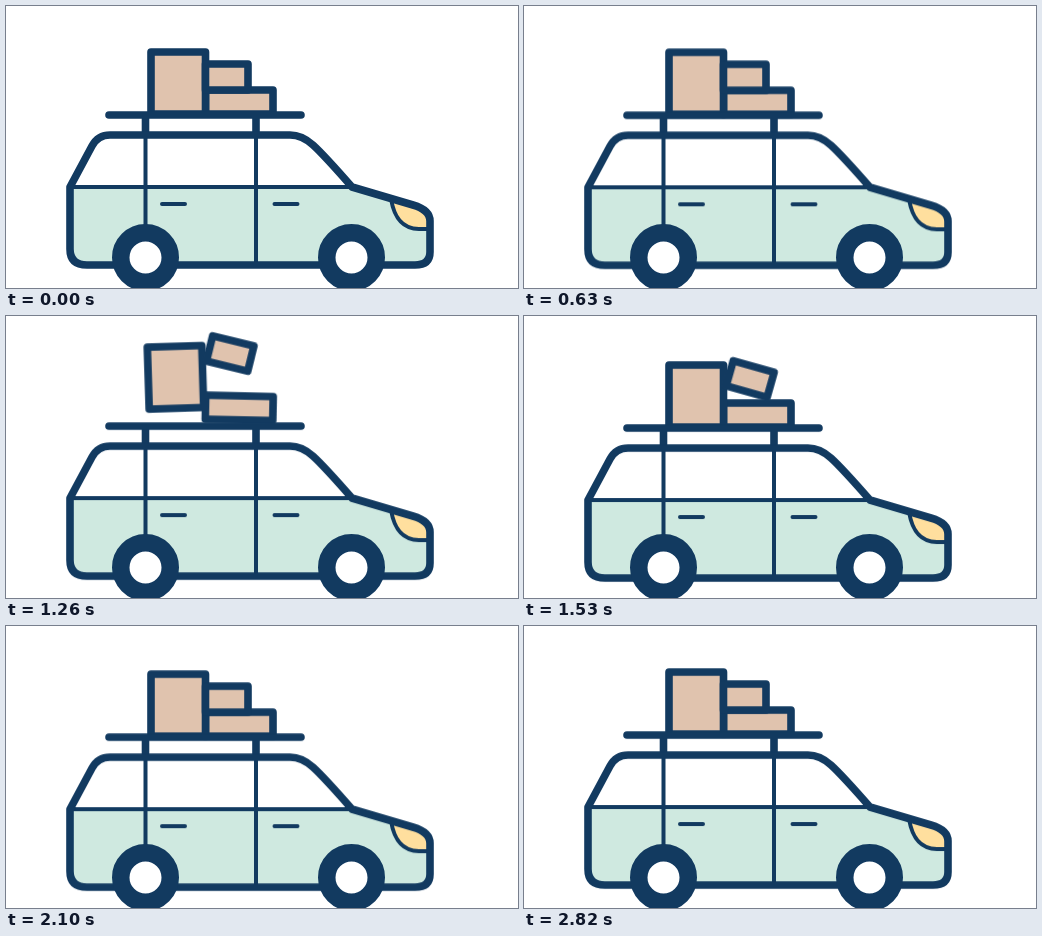
Write an HTML page that moves like this. It is 512 px wide and 282 px high and loops after 2850 ms.

```html
<!DOCTYPE html>
<html lang="en">
<head>
<meta charset="utf-8">
<title>Loaded car</title>
<style>
  html, body { margin: 0; width: 100%; height: 100%; overflow: hidden; background: #fff; }
  svg { display: block; width: 512px; height: 282px; }

  .line { fill: none; stroke: #123a60; stroke-width: 7.6; stroke-linecap: round; stroke-linejoin: round; }
  .thin { stroke-width: 4; }
  .box { fill: #e0c3ae; }
  .tyre { fill: #fff; stroke: #123a60; stroke-width: 17.5; }

  .anim { animation: 2850ms linear infinite; }
  .bounce { animation: bounce 285ms ease-in-out infinite alternate; }
  .tilt { animation-name: tilt; transform-origin: 70px 259px; }
  .tall { animation-name: tall; transform-origin: 145px 108px; }
  .small { animation-name: small; transform-origin: 221px 71px; }
  .low { animation-name: low; transform-origin: 233px 96px; }
  .rear { animation-name: rear; }
  .front { animation-name: front; }
  .bump { animation-name: bump; animation-timing-function: step-end; }

  @keyframes bounce { to { transform: translateY(3px); } }

  /* the bump rushes by in three hard steps */
  @keyframes bump {
    0%, 38.94%, 100% { transform: translateX(600px); }
    35.78% { transform: translateX(171px); }
    36.84% { transform: translateX(0); }
    37.89% { transform: translateX(-171px); }
  }
  @keyframes front {
    0%, 35.78% { transform: translateY(0); }
    36.84% { transform: translateY(-8px); }
    37.89% { transform: translateY(-7px); }
    41%, 100% { transform: translateY(0); }
  }
  @keyframes rear {
    0%, 35.78% { transform: translateY(0); }
    36.84% { transform: translateY(-5px); }
    37.89% { transform: translateY(-8px); }
    42.1%, 100% { transform: translateY(0); }
  }
  @keyframes tilt {
    0%, 35.78% { transform: translateY(0) rotate(0deg); }
    36.84% { transform: translateY(-.7px) rotate(-.8deg); }
    37.89% { transform: translateY(-3px) rotate(-1.6deg); }
    38.94% { transform: translateY(-4px) rotate(.1deg); }
    40% { transform: translateY(-3px) rotate(.4deg); }
    43%, 48.42% { transform: translateY(0) rotate(0deg); }
    53.68% { transform: translateY(.9px) rotate(0deg); }
    57.89%, 100% { transform: translateY(0) rotate(0deg); }
  }
  @keyframes tall {
    0%, 35.78% { transform: translate(0, 0) rotate(0deg); }
    36.84% { transform: translate(-2.4px, -5px) rotate(-3.3deg); }
    37.89% { transform: translate(-2.6px, -7px) rotate(-3.2deg); animation-timing-function: cubic-bezier(.33, .67, .67, 1); }
    42.1% { transform: translate(-2px, -18px) rotate(-2deg); animation-timing-function: cubic-bezier(.33, 0, .67, .33); }
    48.42%, 100% { transform: translate(0, 0) rotate(0deg); }
  }
  @keyframes small {
    0%, 35.78% { transform: translate(0, 0) rotate(0deg); }
    36.84% { transform: translate(.5px, 0) rotate(3deg); animation-timing-function: cubic-bezier(.33, .67, .67, 1); }
    45.26% { transform: translate(3.5px, -35px) rotate(14deg); animation-timing-function: cubic-bezier(.33, 0, .67, .33); }
    53.68% { transform: translate(5.5px, -11px) rotate(16deg); }
    56.84%, 100% { transform: translate(0, 0) rotate(0deg); }
  }
  @keyframes low {
    0%, 35.78% { transform: translateY(0) rotate(0deg); }
    36.84% { transform: translateY(-2px) rotate(.8deg); animation-timing-function: cubic-bezier(.33, .67, .67, 1); }
    41% { transform: translateY(-9px) rotate(2deg); animation-timing-function: cubic-bezier(.33, 0, .67, .33); }
    46%, 100% { transform: translateY(0) rotate(0deg); }
  }
</style>
</head>
<body>
<svg viewBox="0 0 512 282">
  <path class="anim bump" fill="#123a60" d="M240 283 L250 275.5 Q255 272 260 275.5 L268 283 Z"/>

  <g class="anim tilt">
    <g class="bounce">
      <!-- luggage -->
      <rect class="anim line box low" x="199.5" y="84" width="67.5" height="24"/>
      <rect class="anim line box tall" x="145" y="46" width="54.5" height="62"/>
      <rect class="anim line box small" x="199.5" y="58" width="42.5" height="26"/>

      <!-- rack -->
      <path class="line" d="M103 109 H295 M139.5 109 V128 M250 109 V128"/>

      <!-- shell -->
      <path fill="#cfe9e0" d="M64 181 H346 L407 199 Q424 204 424 215 V246 Q424 259 409 259 H81 Q64 259 64 243 Z"/>
      <path class="line thin" fill="none" d="M64 181 H346 M139.5 129 V259 M250 129 V259 M156 198 H179 M268.5 198 H291.5"/>
      <path class="line thin" style="fill:#ffdf9e" d="M385 193 C388 210 395 223 413 223 H424 V215 Q424 204 407 199 Z"/>
      <path class="line" d="M64 181 L86 140 Q92 129 104 129 H284 Q296 129 307 139 Q318 149 346 181 L407 199 Q424 204 424 215 V246 Q424 259 409 259 H81 Q64 259 64 243 Z"/>
    </g>
  </g>

  <circle class="anim tyre rear" cx="139.5" cy="251.5" r="24.75"/>
  <circle class="anim tyre front" cx="345.5" cy="251.5" r="24.75"/>
</svg>
</body>
</html>
```
